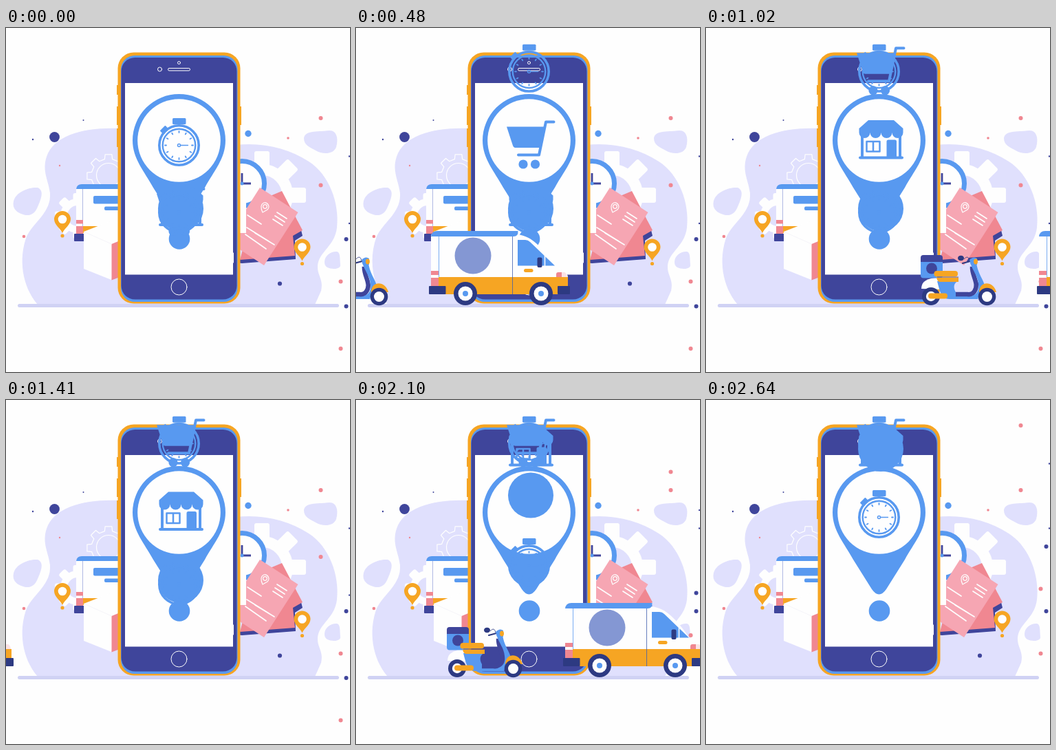
Write an HTML page that moves like this. It is 500 by 500 pixels and loops after 2.73 s.

```html
<!DOCTYPE html>
<html lang="en">
<head>
<meta charset="utf-8">
<title>Delivery app</title>
<style>
  html, body { margin: 0; width: 100%; height: 100%; overflow: hidden; background: #fefefe; }
  svg { display: block; width: 100vw; height: 100vh; }
  .b { fill: #5899f0 } .n { fill: #3f459b } .o { fill: #f6a523 } .p { fill: #f08791 }
  .w { fill: #fefefe } .l { fill: #e0e0fd } .d { fill: #2d3a82 }
  .line { fill: none; stroke: #fefefe; stroke-linecap: round; stroke-linejoin: round }
  .ink { fill: none; stroke: #5899f0; stroke-linecap: round; stroke-linejoin: round }
</style>
</head>
<body>
<svg viewBox="0 0 500 500">
  <defs>
    <g id="marker">
      <path class="o" d="M0 20C-3 13-12 8-12 0A12 12 0 0 1 12 0C12 8 3 13 0 20Z"/>
      <circle class="w" r="6.3"/><circle class="o" cy="24" r="2.6"/>
    </g>
    <g id="watch">
      <rect class="b" x="242" y="131" width="19.500" height="9" rx="1.500"/>
      <rect class="b" x="-5.500" y="-3.500" width="11" height="7" rx="1" transform="translate(230 148) rotate(-45)"/>
      <circle class="ink" cx="251.500" cy="170.500" r="28.700" stroke-width="3.600"/>
      <circle class="ink" cx="251.500" cy="170.500" r="23.800" stroke-width="2.400"/>
      <g id="ticks" class="ink" stroke-width="1.800" transform="translate(251.500 170.500)"></g>
      <circle class="ink" cx="251.500" cy="170.500" r="2" stroke-width="1.500"/>
      <path class="ink" d="M254 170.500H264.500" stroke-width="1.300"/>
    </g>
    <g id="wheel">
      <circle class="d" r="17"/><circle class="w" r="10.500"/><circle class="b" r="4"/>
    </g>
  </defs>

  <!-- backdrop -->
  <path class="l" d="M46 402C23 375 18 335 30 303C40 282 66 268 64 240C62 222 52 208 59 187C70 155 115 144 165 146L335 170C375 166 410 175 440 194C470 213 485 255 481 290C478 317 455 325 453 345C452 360 462 365 458 382L449 402Z"/>
  <path class="l" d="M11 252C14 238 34 231 46 232C56 236 51 249 46 260C41 273 31 274 22 270C14 267 9 261 11 252Z"/>
  <path class="l" d="M433 160C434 148 457 151 470 149C482 149 483 163 480 173C476 184 460 184 450 178C442 173 433 171 433 160Z"/>
  <path class="l" d="M463 340C463 330 474 324 481 325C486 326 485 334 486 345C486 351 473 351 467 348C464 346 463 344 463 340Z"/>
  <rect x="17" y="401" width="467" height="5" rx="2.500" fill="#d0d2f4"/>
  <path id="smallGear" class="line" stroke-width="1.200" transform="translate(149 215)"/>
  <circle class="line" cx="149" cy="214" r="17.500" stroke-width="1.200"/>
  <g id="leftGear" transform="translate(104 273)"></g>
  <g id="bigGear" transform="translate(372 243)"></g>

  <!-- parked van and parcel -->
  <path class="w" d="M102 232H166V300H102Z"/>
  <path class="b" d="M102 234Q103 227 110 227H166V234Z"/>
  <path d="M111.500 234V288" stroke="#8d9ad8" stroke-width=".7"/>
  <rect class="b" x="127" y="244" width="40" height="11.500" rx="2"/>
  <rect class="b" x="143" y="259.500" width="24" height="5.500" rx="2"/>
  <rect class="p" x="102" y="279" width="10" height="5.500"/>
  <rect class="p" x="102" y="288" width="10" height="11"/>
  <path class="o" d="M112 288H140V298H112Z"/>
  <rect class="n" x="99" y="299" width="15" height="11" rx="1"/>
  <path class="w" d="M113 296L154 280L168 285V310L153 366L113 350Z"/>
  <path class="p" d="M153.500 314L168 308V361L153.500 366.500Z"/>
  <path d="M113 296L153.500 314" stroke="#f3f1f8" stroke-width=".8"/>

  <!-- clock and papers -->
  <circle cx="343" cy="226" r="32.500" fill="#fefefe" stroke="#5899f0" stroke-width="7"/>
  <path d="M343 211V226H356" fill="none" stroke="#3f459b" stroke-width="2.800"/>
  <circle class="b" cx="343" cy="226" r="2.500"/>
  <path class="n" d="M335 341L343 342L421 336L420 309L431 302L428 290L380 300Z"/>
  <path class="p" d="M370 250L401 237L431 294L417 302L420 331L340 337L350 300Z"/>
  <path fill="#f6a6b3" d="M369 232L424.500 268L375 345L320 309Z"/>
  <g class="line" stroke-width="1.700">
    <path d="M351 272L371 285M394 268L408 277M391 273L405 282M388 278L402 287M362 298L390 315M350 290L382 310M348 300L378 321"/>
    <path stroke-width="1.200" d="M373 268C370 262 370 256 375 254C381 253 384 260 380 264Z"/>
    <circle stroke-width="1.200" cx="376.500" cy="259.500" r="2.800"/>
  </g>
  <rect class="w" x="338" y="243" width="11" height="55"/>
  <use href="#marker" x="82" y="278"/>
  <use href="#marker" x="430.500" y="318.500"/>
  <g id="specks"></g>

  <!-- phone -->
  <path class="o" d="M161 83h4v14h-4zM161 114h4v27h-4zM161 146h4v27h-4zM338 114h4v27h-4z"/>
  <rect class="o" x="162.500" y="35.500" width="178" height="365" rx="23"/>
  <rect class="b" x="167" y="40" width="169.500" height="358" rx="20"/>
  <rect class="n" x="167.500" y="43" width="168" height="351.500" rx="20"/>
  <rect class="w" x="173" y="80" width="157" height="278.500"/>
  <g class="line" stroke-width="1">
    <circle cx="251.500" cy="50.500" r="2"/><circle cx="223.500" cy="60" r="3"/>
    <rect x="235.500" y="58.500" width="32" height="3.500" rx="1.700"/>
    <circle cx="251.500" cy="376.500" r="11.500"/>
    <path d="M330.500 327V341"/>
  </g>
  <path class="b" d="M184 163.500A67.500 67.500 0 1 1 319 163.500C319 190 302 208 289 232L262 275Q251.500 290 241 275L214 232C201 208 184 190 184 163.500Z"/>
  <circle class="w" cx="251.500" cy="163.500" r="60.300"/>
  <circle class="b" cx="252" cy="306.500" r="15.300"/>

  <!-- sliding icons -->
  <use class="icon" href="#watch"/>
  <g class="icon">
    <path class="b" d="M219 143.500H274L267 174H231Q229 174 228 171Z"/>
    <path class="ink" stroke-width="4" d="M287.500 136.500H276L266 184.500H236"/>
    <circle class="b" cx="243" cy="198" r="6.600"/><circle class="b" cx="260.500" cy="198" r="6.600"/>
  </g>
  <g class="icon">
    <path class="b" d="M236 134H273L286.500 146V152a8 8 0 0 1-16 0a8 8 0 0 1-16 0a8 8 0 0 1-16 0a8 8 0 0 1-16 0V146Z"/>
    <path class="b" d="M225 156h4v31h-4zM280 156h4v31h-4zM262.500 188V165Q262.500 162.500 265 162.500H274.500Q277 162.500 277 165V188Z"/>
    <rect class="b" x="222" y="186.500" width="65" height="4" rx="2"/>
    <path class="ink" stroke-width="2.500" d="M233.500 165H252.500V179.500H233.500ZM243 165V179.500"/>
  </g>
  <g class="icon">
    <circle class="b" cx="254" cy="165" r="33"/>
    <g id="column"></g>
  </g>
  <use class="icon" href="#watch"/>

  <!-- traffic -->
  <g id="traffic">
    <path class="w" d="M109 300H235C256 303 270 318 290 346L301 353Q308 356 308 363V387H109Z"/>
    <path class="b" d="M109 303Q110 295 118 295H235.500Q236 303 229 303Z"/>
    <path class="o" d="M120 362H308V387H120Z"/>
    <path class="p" d="M109 353h11v6h-11zM109 363h11v12h-11z"/>
    <rect class="d" x="106" y="375" width="24.500" height="12" rx="1"/>
    <rect class="d" x="293" y="375" width="18" height="12" rx="1"/>
    <path d="M120.500 303V362" stroke="#5899f0" stroke-width=".8"/>
    <path d="M227.500 303V387" stroke="#3f5fae" stroke-width=".8"/>
    <path class="b" d="M235 308H246Q250 308 253 311L289 345.500H235Z"/>
    <path class="line" stroke-width="1.500" d="M274.500 328V361"/>
    <rect class="d" x="263.500" y="333.500" width="7" height="14.500" rx="2"/>
    <rect class="o" x="244" y="350" width="13.500" height="5" rx="2.500"/>
    <path class="p" d="M291 362V358Q291 355 294 355H299V362Z"/>
    <path d="M299 355H303Q306 356 307 362H299Z" fill="#fbe3e6"/>
    <circle cx="170" cy="331" r="26.500" fill="#8497d3"/>
    <use href="#wheel" x="159" y="386"/>
    <use href="#wheel" x="269" y="386"/>

    <g transform="translate(-195 0)">
      <path class="w" d="M133 379C133 368 142 363 158 363L162 380Z"/>
      <circle class="d" cx="147" cy="390" r="13"/><circle class="w" cx="147" cy="390" r="7.200"/>
      <path class="b" d="M156 368H186C180 371 179 377 183 384H207L216 394H174C162 394 160 383 156 368Z"/>
      <path d="M207 347C206 360 218 372 210 383Q207 388 200 387H183" fill="none" stroke="#3f459b" stroke-width="6.500"/>
      <path class="b" d="M204 341L213 340C214 356 224 366 225 375C222 380 218 394 212 394L200 392C216 388 217 380 216 372C215 360 208 354 204 341Z"/>
      <path class="o" d="M217 384C217 367 238 367 242 384Z"/>
      <circle class="d" cx="228.500" cy="390.500" r="12.800"/><circle class="w" cx="228.500" cy="390.500" r="7.500"/>
      <rect class="o" x="143" y="385.500" width="28" height="8" rx="4"/>
      <rect class="b" x="132" y="332" width="32" height="31.500" rx="4"/>
      <path class="n" d="M132 340V334Q132 330 136 330H160Q164 330 164 334V340Z"/>
      <circle class="n" cx="148" cy="349.500" r="8"/>
      <rect class="o" x="151.500" y="353" width="34.500" height="8.500" rx="4"/>
      <path class="o" d="M155 362.500H187V369H160Q156 369 155 362.500Z"/>
      <path d="M156 362H187" stroke="#3f459b" stroke-width=".8"/>
      <path d="M193 342L204 339" stroke="#2d3a82" stroke-width="2.200" stroke-linecap="round"/>
      <path d="M195 336Q201 329 203 338" fill="none" stroke="#2d3a82" stroke-width=".8"/>
      <ellipse class="d" cx="190.500" cy="334.500" rx="4.500" ry="3.800"/>
      <path class="b" d="M203 337Q209 331 214 335V344H205Z"/>
      <ellipse class="o" cx="212" cy="339.500" rx="3" ry="4"/>
    </g>
  </g>
</svg>
<script>
  const LOOP = 2730, STEP = 30, LAP = 1350;
  const $ = id => document.getElementById(id);
  const repeat = (n, f) => Array.from({ length: n }, (_, i) => f(i)).join('');
  const dots = list => list.map(([x, y, r, c]) => `<circle class="${c}" cx="${x}" cy="${y}" r="${r}"/>`).join('');

  const gear = (r, width, tooth, reach) =>
    `<circle class="line" r="${r}" stroke-width="${width}"/>` +
    repeat(8, i => `<rect class="w" x="${-tooth / 2}" y="${-reach}" width="${tooth}" height="${reach - r + 2}" rx="3" transform="rotate(${i * 45})"/>`);

  const gearOutline = (inner, outer) => {
    const pts = [];
    for (let i = 0; i < 8; i++)
      for (const [a, r] of [[-13, inner], [-9, outer], [9, outer], [13, inner]]) {
        const q = (i * 45 + a) * Math.PI / 180;
        pts.push((r * Math.sin(q)).toFixed(1) + ' ' + (-r * Math.cos(q)).toFixed(1));
      }
    return 'M' + pts.join('L') + 'Z';
  };

  $('ticks').innerHTML = repeat(12, i => `<path d="M0-18.500V-20.500" transform="rotate(${i * 30})"/>`);
  $('smallGear').setAttribute('d', gearOutline(25, 31.5));
  $('leftGear').innerHTML = gear(20, 10, 13, 33);
  $('bigGear').innerHTML = gear(37, 16, 22, 64);

  const column = dots([[457.5, 131, 3, 'p'], [499, 186.5, 1.2, 'n'], [494.5, 307, 3, 'n'], [486.5, 368.5, 3, 'p']]);
  $('column').innerHTML = column;
  $('specks').innerHTML = column + dots([
    [70.5, 158.5, 7.4, 'n'], [39, 162, 1.2, 'n'], [112.5, 134, 1, 'n'], [78, 200, 1.2, 'p'], [26, 303, 2.3, 'p'],
    [352, 153.5, 4.7, 'b'], [410, 160, 1.8, 'p'], [457.5, 228, 3, 'p'], [398, 371.5, 3.1, 'n']
  ].filter(d => d[1] !== 228));

  // Icons swap with a small overshoot; the first two stay at its peak.
  const SWAPS = [45, 610, 1400, 2014], RISE = 260, SETTLE = 140, PEAK = 1.14;
  const ease = u => (1 - Math.cos(Math.PI * Math.min(1, Math.max(0, u)))) / 2;
  const swap = (t, start, settles = true) => {
    const u = t - start;
    return PEAK * ease(u / RISE) - (settles ? (PEAK - 1) * ease((u - RISE) / SETTLE) : 0);
  };
  const iconY = (i, t) =>
    (i > 0 ? 97.5 * (1 - swap(t, SWAPS[i - 1])) : 0) -
    (i < 4 ? 94 * swap(t, SWAPS[i], i > 1) : 0);

  const ROAD = [[0, -343], [60, -300], [480, 0], [750, 195], [1020, 375], [1290, 566], [1350, 610]];
  const roadX = t => {
    const k = ROAD.findIndex(p => p[0] > t);
    const [t0, x0] = ROAD[k - 1], [t1, x1] = ROAD[k];
    return x0 + (x1 - x0) * (t - t0) / (t1 - t0);
  };

  const icons = [...document.querySelectorAll('.icon')];
  const begin = performance.now();
  function draw(now) {
    const t = Math.floor(Math.max(0, now - begin) % LOOP / STEP) * STEP;
    icons.forEach((el, i) => el.setAttribute('transform', `translate(0 ${iconY(i, t).toFixed(2)})`));
    $('traffic').setAttribute('transform', `translate(${roadX(t % LAP).toFixed(2)} 0)`);
    requestAnimationFrame(draw);
  }
  draw(begin);
</script>
</body>
</html>
```
